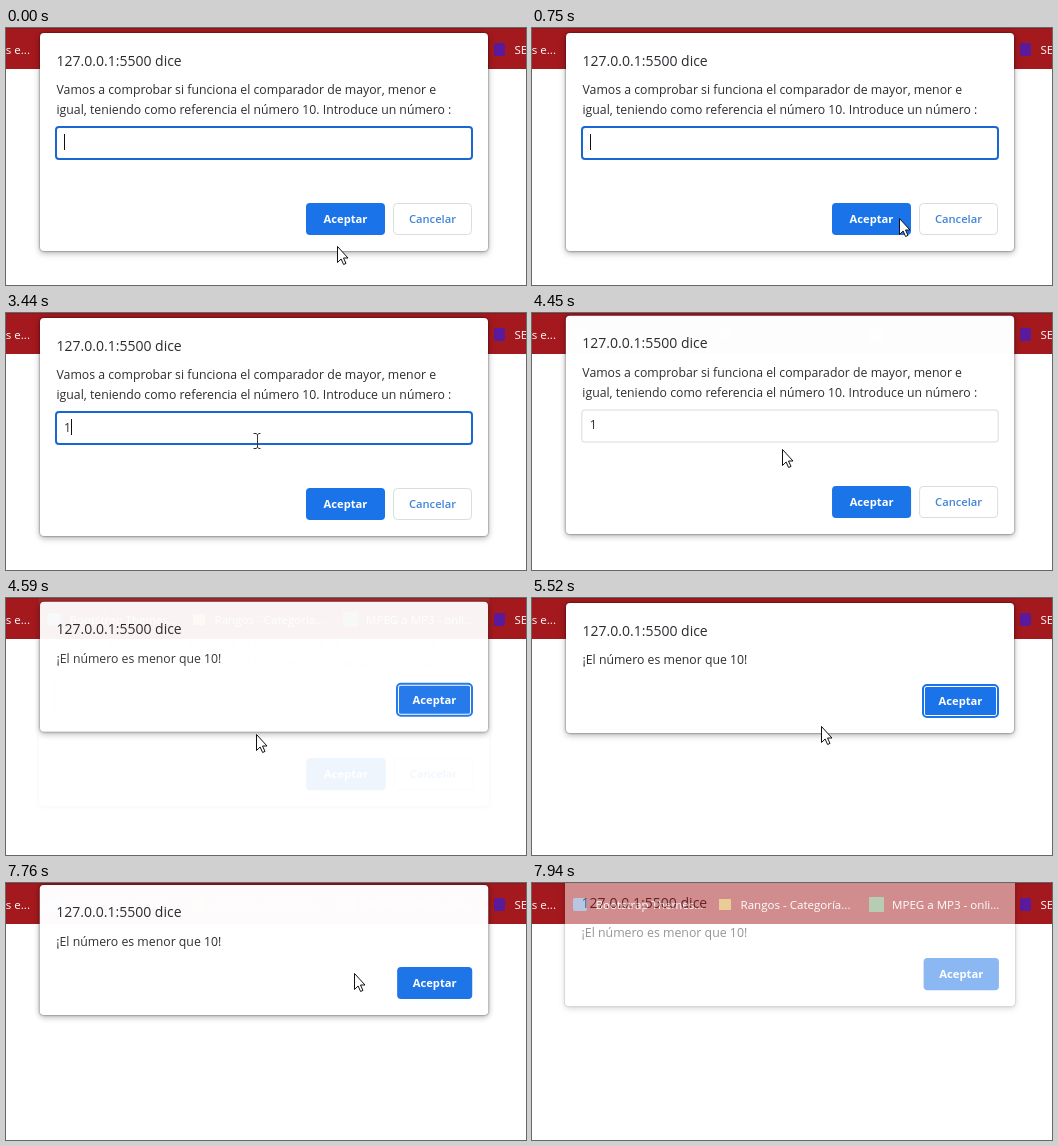
These frames come from a looping animation (520 px wide and 257 px high, 8000 ms). An HTML page:

```html
<!DOCTYPE html>
<html lang="es">
<head>
<meta charset="utf-8">
<style>
  html, body { margin: 0; width: 100%; height: 100%; overflow: hidden; background: #fff; }
  svg { display: block; width: 520px; height: 257px; font: 12.28px "Open Sans", "Noto Sans", sans-serif; fill: #2b2d31; }
  .bar text { font-size: 11.55px; fill: #fff; }
  .panel { fill: #fff; filter: drop-shadow(0 0 1px rgba(0,0,0,.55)) drop-shadow(0 2px 3px rgba(0,0,0,.3)); }
  .title { font-size: 14px; }
  .button { font-size: 11.2px; font-weight: 700; text-anchor: middle; fill: #fff; }
  .plain { font-weight: 600; fill: #4284d8; }
  .blue { fill: #1a73e8; }
  .outline { fill: #fff; stroke: #dadce0; }
</style>
</head>
<body>
<svg viewBox="0 0 520 257">
  <g class="bar">
    <rect width="520" height="41" fill="#a4191d"/>
    <rect width="520" height="1" fill="#8e181b"/>
    <text x="24" y="25.5" text-anchor="end">s e...</text>
    <rect x="41" y="15" width="14" height="13" rx="2" fill="#6f8fc4"/>
    <text x="63.5" y="25.5">Bootstrap Themes...</text>
    <rect x="187" y="16" width="12" height="11" fill="#d99a2c"/>
    <text x="208.5" y="25.5">Rangos - Categoría...</text>
    <rect x="337" y="14" width="15" height="15" fill="#6c9c66"/>
    <text x="360" y="25.5">MPEG a MP3 - onli...</text>
    <rect x="488" y="15" width="11" height="13" rx="2" fill="#5a1a9c"/>
    <text x="508.5" y="25.5">SE</text>
  </g>

  <g id="prompt">
    <rect class="panel" x="34" y="5" width="448" height="218" rx="4"/>
    <text class="title" x="50.5" y="37.5">127.0.0.1:5500 dice</text>
    <text x="50.5" y="66">Vamos a comprobar si funciona el comparador de mayor, menor e</text>
    <text x="50.5" y="86">igual, teniendo como referencia el número 10. Introduce un número :</text>
    <rect id="field" x="50" y="99" width="416" height="32" rx="3" fill="#fff"/>
    <text id="typed" x="58" y="118.5">1</text>
    <rect id="caret" y="106" width="1" height="16" fill="#111"/>
    <rect class="blue" x="300" y="175" width="79" height="32" rx="4"/>
    <text class="button" x="339.5" y="195">Aceptar</text>
    <rect class="outline" x="387.5" y="175.5" width="78" height="31" rx="4"/>
    <text class="button plain" x="426.5" y="195">Cancelar</text>
  </g>

  <g id="alert">
    <rect class="panel" x="34" y="5" width="448" height="130" rx="4"/>
    <text class="title" x="50.5" y="37.5">127.0.0.1:5500 dice</text>
    <text x="50.5" y="66">¡El número es menor que 10!</text>
    <rect class="blue" x="391" y="87" width="75" height="32" rx="4"/>
    <g id="ring" fill="none">
      <rect x="391.5" y="87.5" width="74" height="31" rx="3" stroke="#fff" stroke-width="3"/>
      <rect x="391" y="87" width="75" height="32" rx="4" stroke="#1a73e8" stroke-width="2"/>
    </g>
    <text class="button" x="428.5" y="107">Aceptar</text>
  </g>

  <circle id="click" cx="247.5" cy="109.5" r="12" fill="#fbf774"/>
  <g id="cursor">
    <path id="arrow" d="M.5 .5V16.5L4.1 13L6.6 18.5L9 17.4L6.5 12H11Z" fill="#fff" stroke="#111"/>
    <path id="beam" d="M-3.5 -7.5H-1L.5 -6.5L2 -7.5H3.5M.5 -6.5V6.5M-3.5 7.5H-1L.5 6.5L2 7.5H3.5" fill="none" stroke="#333"/>
  </g>
</svg>
<script>
const LOOP = 8000;
const [prompt_, alert_, field, typed, caret, ring, click, cursor, arrow, beam] =
  ["prompt", "alert", "field", "typed", "caret", "ring", "click", "cursor", "arrow", "beam"]
    .map(id => document.getElementById(id));

// Pointer stops: time, x, y
const stops = [
  [0, 331, 218], [20, 331, 218], [750, 367, 190], [1150, 367, 190], [1740, 249, 110],
  [2340, 249, 110], [2350, 248, 110], [2880, 248, 111], [3670, 252, 132],
  [3700, 252, 132], [3990, 250, 136], [5020, 250, 136], [5300, 272, 139],
  [5790, 312, 113], [5890, 312, 113], [6180, 205, 105], [6440, 335, 99],
  [6680, 398, 102], [6780, 398, 102], [7160, 440, 97], [7450, 440, 97],
  [7760, 348, 90], [7900, 340, -25], [LOOP, 340, -25]
];

const clamp = v => Math.min(1, Math.max(0, v));
const progress = (t, start, length) => clamp((t - start) / length);
const between = (t, a, b) => t >= a && t < b;
const show = (el, on) => el.style.display = on ? "" : "none";
const set = (el, attrs) => { for (const k in attrs) el.setAttribute(k, attrs[k]); };

function pointerAt(t) {
  const i = stops.findIndex(s => s[0] > t);
  const [t0, x0, y0] = stops[i - 1], [t1, x1, y1] = stops[i];
  const u = (t - t0) / (t1 - t0), e = u * u * (3 - 2 * u);
  return [x0 + (x1 - x0) * e, y0 + (y1 - y0) * e];
}

// Dialogs drop in from above, then rise, grow slightly and fade when closed.
function placeDialog(el, centerY, opening, closing) {
  const above = (1 - opening) ** 3, away = closing ** 2;
  const scale = 1 + .006 * away, dy = -25 * above - 15.8 * away;
  set(el, {
    transform: `translate(258 ${centerY + dy}) scale(${scale}) translate(-258 ${-centerY})`,
    opacity: (1 - above) * (1 - closing ** 5)
  });
  show(el, opening > 0 && closing < 1);
}

function draw(t) {
  placeDialog(prompt_, 114, 1, progress(t, 4370, 224));
  placeDialog(alert_, 70, progress(t, 4510, 130), progress(t, 7580, 415));

  const focused = t < 4310;
  set(field, { stroke: focused ? "#1967d2" : "#dadce0", "stroke-width": focused ? 2 : 1 });
  show(typed, t >= 2730);
  set(caret, { x: t < 2730 ? 58 : 65 });
  show(caret, t < 150 || between(t, 680, 1210) || between(t, 1740, 2110) || between(t, 2580, 3790));
  show(ring, t < 7450);

  show(click, between(t, 1890, 2110));
  set(click, { opacity: clamp((2110 - t) / 110) });

  const [x, y] = pointerAt(t);
  const overField = t < 4310 && y < 131;
  set(cursor, { transform: `translate(${Math.round(x)} ${Math.round(y)})` });
  show(cursor, !between(t, 2510, 2880));
  show(arrow, !overField);
  show(beam, overField);
}

function tick() {
  draw(performance.now() % LOOP);
  requestAnimationFrame(tick);
}
tick();
</script>
</body>
</html>
```
